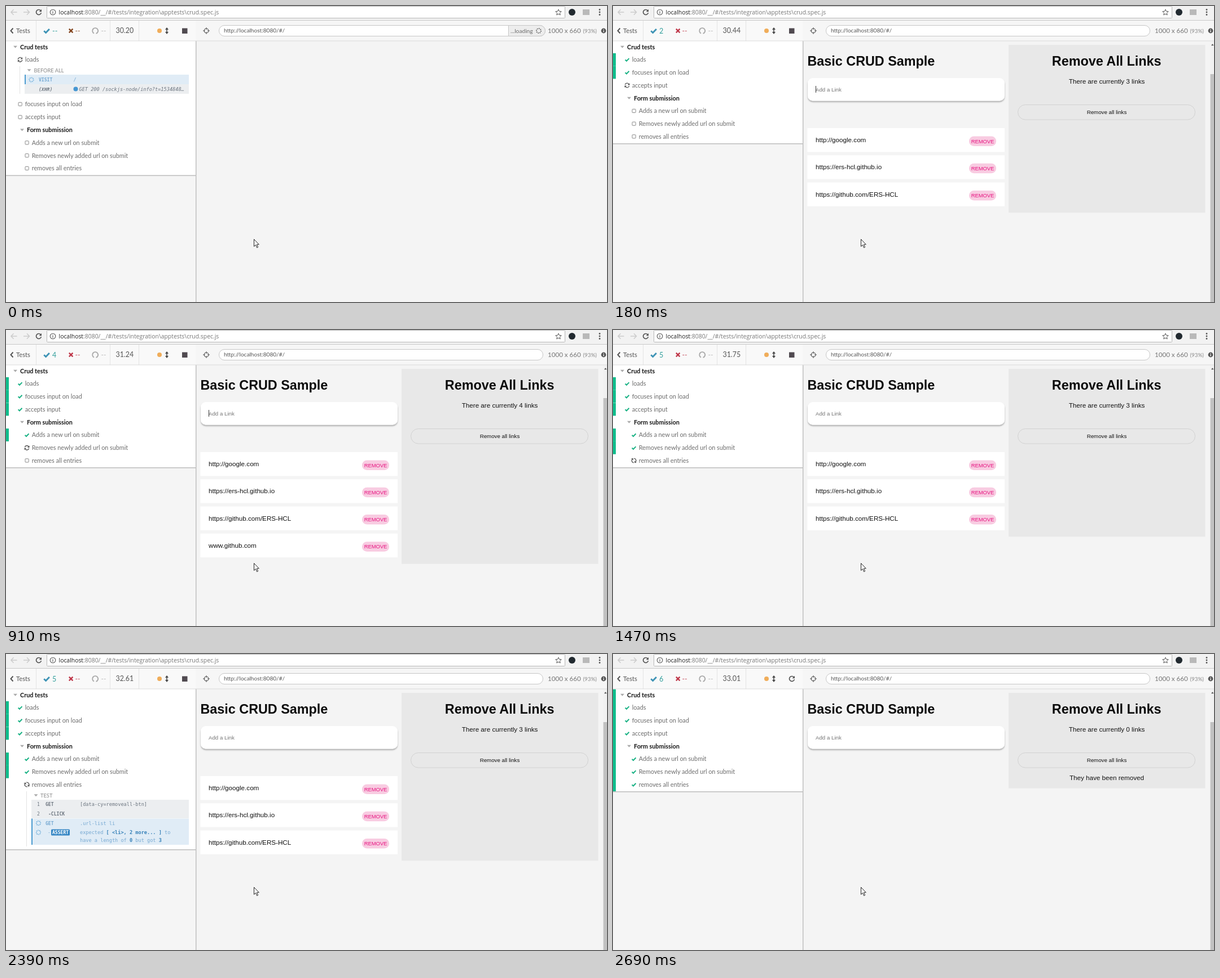
Recreate the animation shown at these times as an HTML page. Size 1065 by 526 pixels, loop 2.74 s.

```html
<!DOCTYPE html>
<html lang="en">
<head>
<meta charset="utf-8">
<title>Crud tests</title>
<style>
  html, body { margin: 0; width: 100%; height: 100%; overflow: hidden; background: #f4f4f4; }
  svg { display: block; width: 100vw; height: 100vh; }
  text { white-space: pre; }
  .ui { font-family: Lato, sans-serif; font-size: 10.8px; fill: #6c6c6c; }
  .bar { font-family: "Open Sans", sans-serif; font-size: 10.4px; fill: #777; }
  .app { font-family: "Liberation Sans", Arial, sans-serif; font-size: 11.65px; fill: #111; }
  .mono { font-family: "DejaVu Sans Mono", monospace; font-size: 8.6px; fill: #6d7680; }
  .cmd { font-size: 8.1px; }
  .h1 { font-size: 23.35px; font-weight: 700; fill: #0c0c0c; }
  .small { font-size: 9.7px; }
  .b { font-weight: 700; }
  .mid { text-anchor: middle; }
  .dark { fill: #161616; }
  .blue { fill: #76a9d2; }
  .deep { fill: #3580b8; }
  .line { fill: none; stroke: #555; }
</style>
</head>
<body>
<svg id="stage" viewBox="0 0 1065 526" preserveAspectRatio="none"></svg>
<script>
const LOOP = 2740;
const EVENT = { page: 130, typed: 590, added: 770, removed: 1005, log: 2205, cleared: 2600, done: 2640 };
const LINK = 'www.github.com';

// label, icon x, row y, start ms, pass ms
const TESTS = [
  ['loads', 25, 95.3, 0, 130],
  ['focuses input on load', 25, 118, 130, 130],
  ['accepts input', 25, 141, 130, 400],
  ['Adds a new url on submit', 37, 186.5, 400, 860],
  ['Removes newly added url on submit', 37, 209.3, 860, 1005],
  ['removes all entries', 37, 232, 1005, 2640]
];

// screen refreshes: index, ms
const TICKS = [[0, 0], [1, 40], [4, 180], [5, 220], [12, 550], [13, 590], [20, 910], [21, 970],
  [24, 1110], [25, 1150], [32, 1470], [33, 1530], [36, 1670], [37, 1710], [46, 2170], [47, 2210],
  [48, 2270], [51, 2390], [52, 2430], [58, 2690], [59, 2740]];

// ms, seconds on the test clock
const CLOCK = [[0, 30.2], [180, 30.44], [910, 31.24], [1470, 31.75], [2170, 32.42], [2390, 32.61],
  [2603, 32.83], [2646, 33.01], [2740, 33.01]];

const text = (x, y, cls, body, extra = '') => `<text x="${x}" y="${y}" class="${cls}" ${extra}>${body}</text>`;
const rect = (x, y, w, h, fill, extra = '') => `<rect x="${x}" y="${y}" width="${w}" height="${h}" fill="${fill}" ${extra}/>`;
const path = (d, extra = '') => `<path d="${d}" ${extra}/>`;
const at = (x, y, body, extra = '') => `<g transform="translate(${x} ${y})" ${extra}>${body}</g>`;
const group = (id, body) => `<g id="${id}">${body}</g>`;
const fold = (x, y) => path(`M${x - 3.5} ${y - 1.8}h7l-3.5 4z`, 'fill="#aaa"');
const tick = (color, scale = 1) =>
  path('M-3.4 .2L-1 2.5L3.5-2.2', `fill="none" stroke="${color}" stroke-width="2" transform="scale(${scale})"`);
const ring = (x, y, color, r = 3.7) => at(x, y,
  `<circle class="ring" r="${r}" fill="none" stroke="${color}" stroke-width="1.8" pathLength="16" stroke-dasharray="1 1"/>`);

const halfTurn = path('M-3.8-.5A3.8 3.8 0 0 1 2.8-2.6', 'class="line" stroke-width="1.4"')
  + path('M4.2-4.4V-.8H.6Z', 'fill="#555"');
const cycle = halfTurn + `<g transform="rotate(180)">${halfTurn}</g>`;
const reload = path('M3.4-3A4.5 4.5 0 1 0 4.4 1.1', 'class="line" stroke-width="1.7"')
  + path('M5-5.2V-.8H.6Z', 'fill="#555"');

function browserBar() {
  return rect(0, 0, 1065, 26, '#f2f2f2') + rect(0, 25, 1065, 1, '#c9c9c9')
    + rect(72.5, .5, 918, 21, '#fff', 'stroke="#b5b5b5" rx="1"')
    + path('M19.5 11H9m4.5-4.7L9 11l4.5 4.7M31 11h10.5m-4.5-4.7L41.5 11 37 15.7', 'class="line" style="stroke:#ccc" stroke-width="1.5"')
    + at(58, 11, reload)
    + at(83, 11, '<circle r="4.8" class="line" stroke-width="1.1"/>' + path('M0-2.6v1.3M0-.4v3.2', 'class="line" stroke-width="1.2"'))
    + text(93.5, 15, 'bar', '<tspan fill="#222">localhost</tspan>:8080/__/#/tests/integration\\apptests\\crud.spec.js')
    + at(979, 11, path('M0-5l1.5 3.4 3.7.4-2.8 2.5.8 3.7L0 3.1-3.2 5l.8-3.7-2.8-2.5 3.7-.4z', 'class="line"'))
    + '<circle cx="1003" cy="11" r="6" fill="#222a30"/>' + rect(1022, 6, 12, 10, '#b9b9b9')
    + [6.5, 11, 15.5].map(y => `<circle cx="1052" cy="${y}" r="1.4" fill="#555"/>`).join('');
}

function toolbar() {
  const cross = '<circle r="4" class="line"/>' + path('M-6 0h4M6 0h-4M0-6v4M0 6v-4', 'class="line"');
  return rect(0, 26, 1065, 36, '#f6f6f6') + rect(0, 26, 336, 36, '#f9f9f9')
    + [53, 184, 235].map(x => rect(x, 26, 1, 36, '#e4e4e4')).join('')
    + path('M12.5 39.5L8.5 44l4 4.5', 'class="line" stroke-width="2"')
    + text(18, 48, 'ui', 'Tests', 'style="font-size:11.2px;fill:#555"')
    + at(72, 44, tick('#3d93b5', 1.4))
    + text(82, 48.5, 'ui', '--', 'id="passed" style="font-size:12.5px;fill:#329f9c"')
    + `<g id="failMark">${path('M111.8 40.7l6.6 6.6m0-6.6l-6.6 6.6', 'fill="none" stroke="currentColor" stroke-width="2.4"')}`
    + text(122.5, 48, 'ui', '--', 'style="font-size:12px;fill:currentColor"') + '</g>'
    + path('M159.5 48.9A5 5 0 1 0 156 48.6', 'fill="none" stroke="#aaa" stroke-width="1.9"')
    + text(168.5, 48, 'ui', '--', 'style="font-size:12px;fill:#b4b4b4"')
    + text(194.5, 48, 'ui', '30.20', 'id="clock" style="font-size:12.4px;fill:#555"')
    + '<circle cx="272" cy="44" r="4" fill="#f0ad5a"/>'
    + path('M285 40v8', 'class="line" stroke-width="1.7"') + path('M282 42l3-4 3 4zm0 4l3 4 3-4z', 'fill="#444"')
    + group('stop', rect(312, 39.5, 9.5, 9.5, '#504a50')) + group('rerun', at(317, 44, reload))
    + at(355, 44, cross)
    + rect(377.5, 34.5, 574, 19, '#fff', 'stroke="#c6c6c6" rx="9.5" id="address"')
    + group('loading', path('M890.5 34.5H946a9.5 9.5 0 0 1 0 19h-55.5z', 'fill="#ededed" stroke="#c6c6c6"')
      + text(894, 47.5, 'ui', '...loading', 'style="font-size:10.2px"') + ring(944, 44, '#555', 4))
    + text(386, 47.3, 'ui', 'http://localhost:8080/#/', 'style="font-size:10.1px;fill:#555"')
    + text(960, 48, 'ui', '1000 x 660', 'style="font-size:11.6px;fill:#777"')
    + text(1022.5, 47.5, 'ui', '(93%)', 'style="font-size:9.8px;fill:#888"')
    + '<circle cx="1059" cy="44" r="4.4" fill="#555"/>' + path('M1059 41.2v1.4m0 1v3', 'fill="none" stroke="#fff" stroke-width="1.4"')
    + rect(0, 61.5, 1065, 1, '#dcdcdc');
}

function testRow([label, x, y], i) {
  return at(x, y, rect(-3, -3.2, 6.2, 6.2, 'none', `id="box${i}" stroke="#888" rx="1"`)
    + group('spin' + i, cycle) + group('check' + i, tick('#1db386')))
    + text(x + 8.7, y + 3.8, 'ui', label)
    + rect(0, y - 11.4, 5, 22.8, '#0fbd8c', `id="mark${i}"`);
}

function visitLog() {
  return group('visitLog', rect(24, 107, 1, 49, '#e2e2e2') + fold(41, 114)
    + text(49.5, 117.7, 'ui', 'BEFORE ALL', 'style="font-size:9.3px;fill:#888"')
    + rect(33, 122, 291, 17, '#e0ecf6') + rect(33, 122, 2, 17, '#4b9bd0') + rect(33, 139, 291, 17, '#eceef0')
    + ring(45, 131, '#62a6d6') + text(58, 133.8, 'mono cmd b blue', 'VISIT') + text(119.5, 134, 'mono blue', '/')
    + text(58, 150.8, 'mono cmd b', '(XHR)', 'font-style="italic"')
    + '<circle cx="123.5" cy="147.5" r="4" fill="#4596d2"/>'
    + text(129.5, 151, 'mono', 'GET 200 /sockjs-node/info?t=1534848…', 'font-style="italic"'));
}

function assertLog() {
  const deep = s => `<tspan class="b deep">${s}</tspan>`;
  return group('assertLog', rect(36, 244, 1, 98, '#e2e2e2') + fold(53, 251)
    + text(61, 254.5, 'ui', 'TEST', 'style="font-size:9.3px;fill:#888"')
    + rect(45, 259, 279, 33, '#eceef0') + rect(45, 292.5, 279, 46.5, '#e0ecf6') + rect(45, 292.5, 2, 46.5, '#4b9bd0')
    + text(55, 270.3, 'mono cmd', '1') + text(70, 270.3, 'mono cmd b', 'GET') + text(131, 270.3, 'mono', '[data-cy=removeall-btn]')
    + text(55, 286.8, 'mono cmd', '2') + text(75, 286.8, 'mono cmd b', '-CLICK')
    + ring(57.5, 300.5, '#62a6d6') + text(70, 303.8, 'mono cmd b blue', 'GET') + text(131, 303.8, 'mono blue', '.url-list li')
    + ring(57.5, 317, '#62a6d6') + text(74, 320.3, 'mono cmd blue', '-')
    + rect(80, 311.5, 33, 11, '#3586c4', 'rx="1.5"') + text(82, 320.2, 'mono cmd b', 'ASSERT', 'style="fill:#fff"')
    + text(131, 320.3, 'mono blue', `expected ${deep('[ &lt;li&gt;, 2 more... ]')} to`)
    + text(131, 334.3, 'mono blue', `have a length of ${deep('0')} but got ${deep('3')}`));
}

function reporter() {
  return rect(0, 62, 336, 464, '#f5f5f5')
    + group('sheet', rect(0, 62, 336, 182.5, '#fff', 'id="paper"') + rect(0, 244, 336, 1.6, '#c0c0c0', 'id="edge"'))
    + fold(16.5, 72.5) + text(25, 76.5, 'ui b dark', 'Crud tests')
    + testRow(TESTS[0], 0) + visitLog()
    + group('rest', fold(28.5, 163.5) + text(37, 167.5, 'ui b dark', 'Form submission')
      + TESTS.slice(1).map((test, i) => testRow(test, i + 1)).join(''))
    + assertLog() + rect(0, 62.5, 5, 181.5, '#0fbd8c', 'id="suiteMark"')
    + rect(336, 26, 1.4, 500, '#bcbcbc');
}

function linkRow(url, i) {
  return `<g id="link${i}" transform="translate(0 ${i * 48.25})">` + rect(344.5, 217, 349.5, 42.3, '#fff')
    + text(359, 242, 'app', url) + rect(631, 231.5, 48, 17.5, '#f8cbe1', 'rx="8.5"')
    + text(655, 243.6, 'app mid', 'REMOVE', 'style="font-size:9.4px;fill:#e6127f"') + '</g>';
}

function appPage() {
  const links = ['http://google.com', 'https://ers-hcl.github.io', 'https://github.com/ERS-HCL', LINK];
  return group('page', text(344.5, 105.7, 'app h1', 'Basic CRUD Sample')
    + rect(345, 128, 349, 40.5, '#fff', 'rx="9" filter="url(#lift)"')
    + text(359, 151.5, 'app small', 'Add a Link', 'id="field"') + rect(359, 142, 1, 12, '#333', 'id="caret"')
    + links.map(linkRow).join('')
    + rect(701, 69, 348.5, 298, '#e8e8e8', 'id="panel"')
    + text(874.7, 105.7, 'app h1 mid', 'Remove All Links')
    + text(875, 138.2, 'app mid', '', 'id="count"')
    + rect(717.5, 175.5, 314, 26.5, 'none', 'stroke="#d2d2d2" rx="13.2"')
    + text(875, 191.7, 'app small mid', 'Remove all links')
    + text(875, 223.6, 'app mid', 'They have been removed', 'id="notice"')
    + rect(1058.5, 63, 6.5, 463, '#f1f1f1') + rect(1058.5, 121, 6.5, 405, '#c1c1c1')
    + path('M1060 70.3h4.6l-2.3-3z', 'fill="#505050"'));
}

const stage = document.getElementById('stage');
stage.innerHTML = '<defs><filter id="lift" x="-5%" y="-20%" width="110%" height="150%">'
  + '<feDropShadow dx="0" dy="2.2" stdDeviation="1.3" flood-color="#000" flood-opacity=".3"/></filter></defs>'
  + rect(0, 0, 1065, 526, '#f4f4f4') + appPage() + reporter() + toolbar() + browserBar()
  + path('M439.5 414.5v12.8l3-2.8 2.1 5 2-.9-2.1-4.8h3.8z', 'fill="#fff" stroke="#222" stroke-linejoin="round"');

const $ = id => document.getElementById(id);
const set = (id, name, value) => $(id).setAttribute(name, value);
const show = (id, on) => { $(id).style.display = on ? '' : 'none'; };
const rings = [...document.querySelectorAll('.ring')];

function span(table, value, column) {
  let i = 0;
  while (i < table.length - 2 && value >= table[i + 1][column]) i++;
  return [table[i], table[i + 1]];
}

function snap(ms) {
  const [[n0, t0], [n1, t1]] = span(TICKS, ms, 1);
  const step = (t1 - t0) / (n1 - n0);
  return t0 + Math.floor((ms - t0) / step + 1e-6) * step;
}

function clock(ms) {
  const [[t0, s0], [t1, s1]] = span(CLOCK, ms, 0);
  return s0 + (s1 - s0) * (ms - t0) / (t1 - t0);
}

function render(ms) {
  const t = snap(ms);
  const loaded = t >= EVENT.page, cleared = t >= EVENT.cleared, done = t >= EVENT.done;
  const logOpen = t >= EVENT.log && !done;
  const extra = t >= EVENT.added && t < EVENT.removed;
  const passed = TESTS.filter(test => t >= test[4]).length;

  $('clock').textContent = clock(t).toFixed(2);
  $('passed').textContent = passed || '--';
  $('failMark').style.color = loaded ? '#c0394b' : '#84451f';
  show('stop', !done);
  show('rerun', done);
  show('loading', !loaded);
  set('address', 'width', loaded ? 574 : 578);

  TESTS.forEach(([, , , start, pass], i) => {
    show('box' + i, t < start);
    show('spin' + i, t >= start && t < pass);
    show('check' + i, t >= pass);
    show('mark' + i, t >= pass);
    set('spin' + i, 'transform', `rotate(${(t - start) * .18})`);
  });
  rings.forEach(r => r.setAttribute('transform', `rotate(${t * .18})`));

  const bottom = !loaded ? 300.5 : logOpen ? 347 : 244;
  set('paper', 'height', bottom - 62);
  set('edge', 'y', bottom);
  set('rest', 'transform', `translate(0 ${loaded ? 0 : 56.5})`);
  show('visitLog', !loaded);
  show('assertLog', logOpen);
  show('suiteMark', done);

  const typed = t >= EVENT.typed && t < EVENT.added
    ? LINK.slice(0, Math.floor((t - EVENT.typed) / 11)) : '';
  $('field').textContent = typed || 'Add a Link';
  $('field').style.fill = typed ? '#111' : '#757575';
  show('caret', t < EVENT.removed && !typed);
  show('page', loaded);
  for (let i = 0; i < 4; i++) show('link' + i, i < 3 ? !cleared : extra);
  set('panel', 'height', cleared ? 169.5 : extra ? 346.5 : 298.3);
  $('count').textContent = `There are currently ${cleared ? 0 : extra ? 4 : 3} links`;
  show('notice', cleared);
}

const origin = performance.now();
function loop() {
  render((performance.now() - origin) % LOOP);
  requestAnimationFrame(loop);
}
loop();
</script>
</body>
</html>
```
